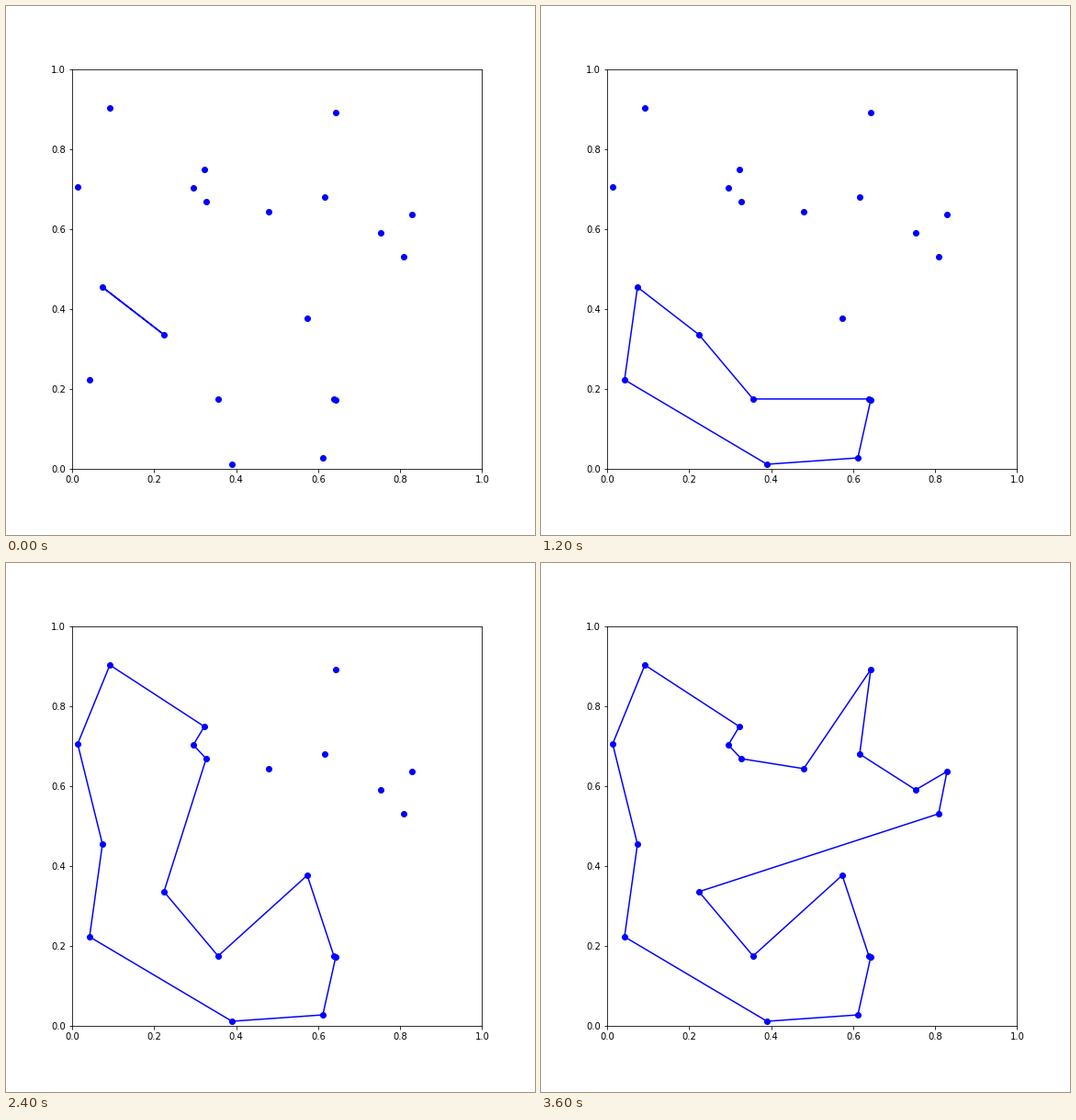
Animation of 576x576 px, one loop 3.8 s. Source, as a matplotlib script:

```python
from math import dist

import matplotlib.pyplot as plt
from matplotlib.animation import FuncAnimation

STEP_MS = 200

CITIES = [
    (0.074, 0.455), (0.224, 0.336), (0.356, 0.175), (0.390, 0.0115),
    (0.0425, 0.223), (0.6115, 0.0275), (0.643, 0.1725), (0.6385, 0.175),
    (0.5735, 0.377), (0.0135, 0.706), (0.092, 0.9035), (0.3225, 0.7495),
    (0.2955, 0.7035), (0.327, 0.669), (0.4795, 0.644), (0.616, 0.6805),
    (0.7525, 0.591), (0.8085, 0.531), (0.829, 0.637), (0.643, 0.892),
]


def insert_nearest(tour):
    """Add the city closest to the tour where it lengthens the tour least."""
    rest = [c for c in CITIES if c not in tour]
    new = min(rest, key=lambda c: min(dist(c, t) for t in tour))

    def detour(i):
        a, b = tour[i - 1], tour[i % len(tour)]
        return dist(a, new) + dist(new, b) - dist(a, b)

    at = min(range(1, len(tour) + 1), key=detour)
    return tour[:at] + [new] + tour[at:]


# One tour per step, growing from the first city and its neighbour.
tours = [insert_nearest(CITIES[:1])]
while len(tours[-1]) < len(CITIES):
    tours.append(insert_nearest(tours[-1]))

fig, ax = plt.subplots(figsize=(8, 8), dpi=72)
fig.subplots_adjust(left=0.125, right=0.9, bottom=0.125, top=0.88)
ax.set(xlim=(0, 1), ylim=(0, 1))
ax.plot(*zip(*CITIES), "bo")
path, = ax.plot([], [], "b-")


def update(step):
    tour = tours[step]
    path.set_data(*zip(*tour, tour[0]))
    return path,


anim = FuncAnimation(fig, update, frames=len(tours), interval=STEP_MS,
                     repeat=True, repeat_delay=0)
plt.show()
```
